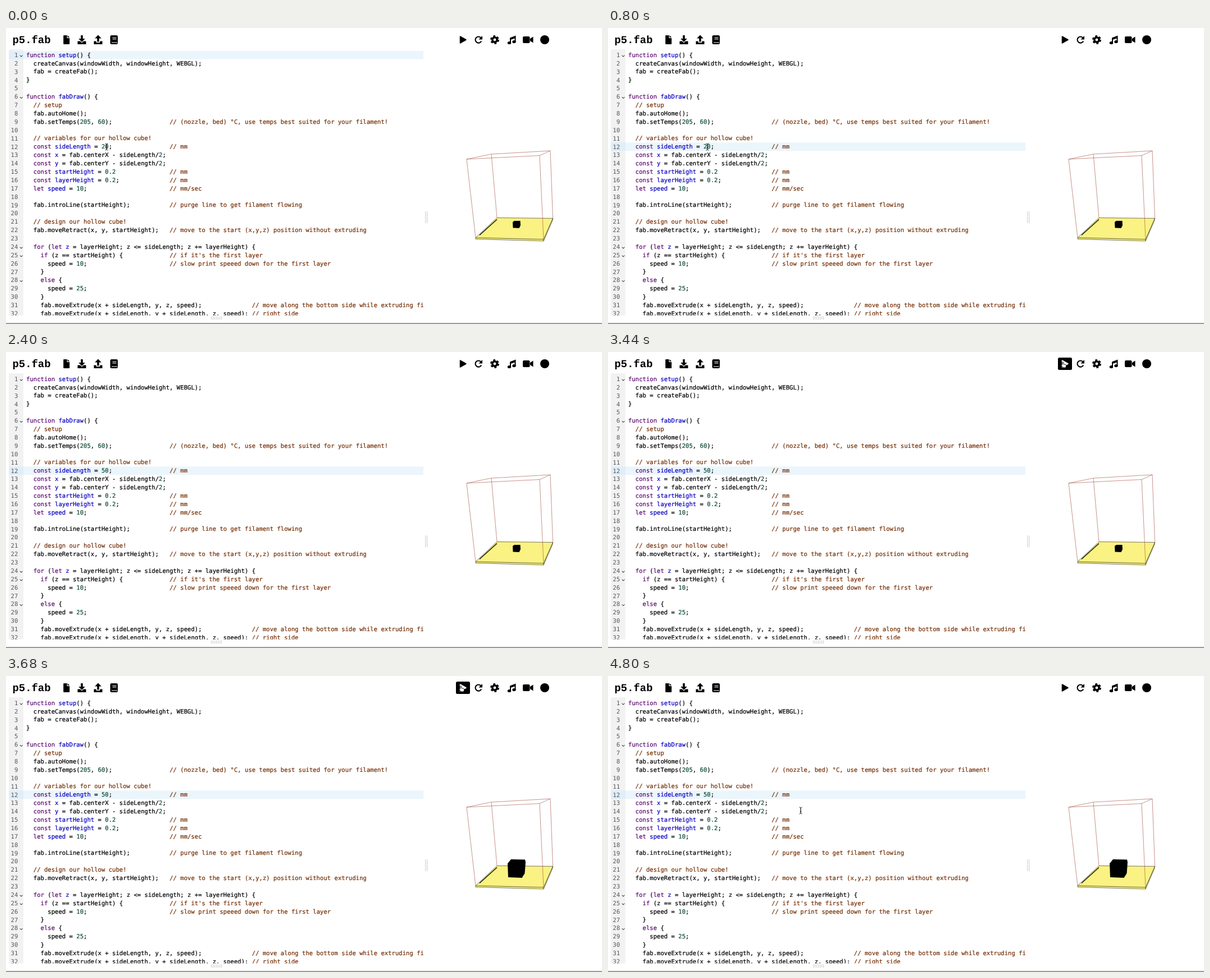
Write an HTML page that moves like this. It is 1061 by 528 pixels and loops after 4.88 s.

```html
<!DOCTYPE html>
<html lang="en">
<head>
<meta charset="utf-8">
<title>p5.fab editor</title>
<style>
  html, body { margin: 0; width: 100%; height: 100%; overflow: hidden; background: #fff; }
  svg { display: block; }
  text { white-space: pre; text-rendering: geometricPrecision; }
  #editor text { font: 10.605px "DejaVu Sans Mono", monospace; stroke: #000; stroke-width: .22; }
  .title { font: bold 18.9px "Liberation Mono", "Courier New", monospace; }
  #editor .keyword { fill: #5c0a70; stroke: #5c0a70; }
  #editor .name { fill: #0a00c0; stroke: #0a00c0; }
  #editor .number { fill: #0f4c38; stroke: #0f4c38; }
  #editor .comment { fill: #742f06; stroke: #742f06; }
  #editor .lineno { fill: #555; stroke: none; text-anchor: end; }
  .line { fill: none; stroke: #000; }
</style>
</head>
<body>
<svg width="1061" height="528" viewBox="0 0 1061 528">
  <defs>
    <clipPath id="pane"><path d="M5 38H743V512.5H5z"/></clipPath>
    <pattern id="dots" width="3" height="3" patternUnits="userSpaceOnUse"><path d="M0 0h1.4v1.4H0z" fill="#b4b4b4"/></pattern>
  </defs>

  <text class="title" x="11.500" y="27">p5.fab</text>
  <g id="fileIcons">
    <path d="M103 13h5.5v5h4.700v10q0 1-1 1h-9q-1 0-1-1v-14q0-1 .8-1zM109.600 13l3.600 3.800h-3.600z"/>
    <path d="M133.200 13h3.600v6h4l-5.800 6-5.800-6h4zM127.500 23.500h4.500l3 3 3-3h4.500v5.500h-15z"/>
    <path d="M162.200 24.500v-6h-4l5.800-6 5.800 6h-4v6zM156.500 23.500h4.200v2.500h6.600v-2.500h4.200v5.500h-15z"/>
    <rect x="185.500" y="13" width="13.500" height="16" rx="2.500"/>
    <path d="M189.500 17.500h7M189.500 20h7M188 26h10" stroke="#fff" stroke-width="1.200"/>
  </g>

  <rect id="button" x="801" y="10" width="25" height="22" rx="2.500"/>
  <path id="play" d="M808.500 15v12l10.500-6z" stroke-width="1.500" stroke-linejoin="round"/>
  <path class="line" d="M846.200 23.500A5.600 5.600 0 1 1 845.500 17.500" stroke-width="2.100"/>
  <path d="M848 14v6.500h-6.500z"/>
  <circle class="line" cx="870" cy="21" r="4.200" stroke-width="3.600"/>
  <circle class="line" cx="870" cy="21" r="6.500" stroke-width="3" stroke-dasharray="3.600 3.207"/>
  <path d="M897 17.500l10.500-4v11h-2v-6l-6.500 2.300v6h-2z"/>
  <ellipse cx="896" cy="26.500" rx="3.200" ry="2.600"/>
  <ellipse cx="904.500" cy="24.500" rx="3.200" ry="2.600"/>
  <rect x="920" y="15" width="12.500" height="12" rx="2"/>
  <path d="M933 19l5.500-3.500v11l-5.500-3.500z"/>
  <circle cx="959" cy="21" r="8"/>

  <g clip-path="url(#pane)">
    <rect x="5" y="38" width="26" height="475" fill="#f2f2f2"/>
    <g id="active">
      <rect x="31" width="712" height="14.870" fill="#ebf5fc"/>
      <rect x="5" width="26" height="14.870" fill="#e0eef9"/>
    </g>
    <g id="flash" fill="#ff5f00"></g>
    <g id="editor"></g>
    <path id="caret" d="M176.300 205v13.500" stroke="#000"/>
  </g>
  <rect width="5" height="21" fill="url(#dots)" transform="translate(746 327.500)"/>
  <rect width="20" height="5" fill="url(#dots)" transform="translate(365 515)"/>
  <path d="M0 527h1061" stroke="#37343a"/>

  <g fill="none" stroke-linejoin="round" stroke-width=".6">
    <path d="M836 374L874 338.500 973.500 339.500 973 343 957 380 836 376.500z" fill="#faf282" stroke="#222"/>
    <path d="M836 374L957 377 973.500 339.500M957 377V380" stroke="#000"/>
    <path d="M843 369.500L874 341.500" stroke="#000" stroke-width="1.200"/>
    <path d="M820 234L864 225 969 219 950 227.500zL836 374M864 225L874 338.500M969 219L973.500 339.500M950 227.500L957 377" stroke="#a04a3c"/>
    <path id="cube" fill="#000"/>
  </g>

  <g id="pointer" stroke-linejoin="round">
    <path id="ibeam" d="M-2.500-6Q0-6 0-4V4Q0 6-2.500 6M2.500-6Q0-6 0-4V4Q0 6 2.500 6M-1.500 2h3" fill="none" stroke="#333"/>
    <path id="arrow" d="M0 0V12L2.800 9.500 4.700 13.500 6.500 12.700 4.700 8.800H8.500z" stroke="#fff" stroke-width=".8"/>
    <path id="hand" d="M-2.500-4q1-1.500 2 0v3.500l4 .8q1.500.4 1.200 2l-.8 3.700h-5l-3.200-4.500q0-1.300 1.800-.5z"
      fill="#fff" stroke="#000" stroke-width=".9"/>
  </g>
</svg>

<script>
const code = `function setup() {
  createCanvas(windowWidth, windowHeight, WEBGL);
  fab = createFab();
}

function fabDraw() {
  // setup
  fab.autoHome();
  fab.setTemps(205, 60);                // (nozzle, bed) °C, use temps best suited for your filament!
${"  "}
  // variables for our hollow cube!
  const sideLength = 50;                // mm
  const x = fab.centerX - sideLength/2;${" "}
  const y = fab.centerY - sideLength/2;
  const startHeight = 0.2               // mm
  const layerHeight = 0.2;              // mm
  let speed = 10;                       // mm/sec

  fab.introLine(startHeight);           // purge line to get filament flowing

  // design our hollow cube!
  fab.moveRetract(x, y, startHeight);   // move to the start (x,y,z) position without extruding

  for (let z = layerHeight; z <= sideLength; z += layerHeight) {${" "}
    if (z == startHeight) {             // if it's the first layer
      speed = 10;                       // slow print speeed down for the first layer
    }
    else {
      speed = 25;
    }
    fab.moveExtrude(x + sideLength, y, z, speed);              // move along the bottom side while extruding filament
    fab.moveExtrude(x + sideLength, y + sideLength, z, speed); // right side`.split("\n");

const LOOP = 4880, STEP = 80, PITCH = 14.873, CHAR = 6.384, LEFT = 36;
const $ = id => document.getElementById(id);
const show = (id, on) => $(id).style.display = on ? "" : "none";
const rowY = row => 40.7 + row * PITCH;

const tokens = /(?<comment>\/\/.*)|(?<name>(?<=(?:function|const|let) )\w+)|(?<keyword>\b(?:function|const|let|for|if|else)\b)|(?<number>\b\d[\d.]*)/g;
const highlight = line => line.replace(/</g, "&lt;").replace(tokens, (text, ...rest) => {
  const groups = rest.at(-1);
  const kind = Object.keys(groups).find(key => groups[key]);
  return `<tspan class="${kind}">${text}</tspan>`;
});

const foldable = [1, 6, 24, 25, 28];
code.forEach((line, row) => {
  const y = rowY(row);
  $("flash").innerHTML += `<rect x="${LEFT - .5}" y="${y + 1}" width="${line && line.length * CHAR + 1}" height="12.6"/>`;
  $("editor").innerHTML += `<text class="lineno" x="21.300" y="${y + 11.2}">${row + 1}</text>
    <text x="${LEFT}" y="${y + 11}">${highlight(line)}</text>` +
    (foldable.includes(row + 1) ? `<path class="line" d="M25 ${y + 8}l2.200 2.500 2.200-2.500"/>` : "");
});
const sideLength = [...document.querySelectorAll("#editor .number")].find(el => el.textContent === "50");

const smallCube = "M902 346L905 344 915.5 344 916 352 913.5 357 902.5 356.500z";
const largeCube = "M893 334.500L899 327 924 327.500 925 332 923.500 352 918.500 360 894 359z";

// Pointer stops: time, x, y
const stops = [[0, 179, 212], [320, 177, 212], [2480, 177, 212], [3080, 811, 22], [4440, 811, 22], [4800, 343, 240], [LOOP, 343, 240]];
function pointerAt(t) {
  const i = stops.findIndex(stop => stop[0] > t);
  const [t0, x0, y0] = stops[i - 1], [t1, x1, y1] = stops[i];
  const p = (t - t0) / (t1 - t0), e = p * p * (3 - 2 * p);
  return [x0 + (x1 - x0) * e, y0 + (y1 - y0) * e];
}

function draw(t) {
  const during = (from, to) => t >= from && t < to;
  const [x, y] = pointerAt(t);
  const hover = x > 801 && x < 826 && y > 10 && y < 32;
  const inEditor = x < 743 && y > 38;

  $("active").setAttribute("transform", `translate(0 ${rowY(t < 200 ? 0 : 11)})`);
  sideLength.textContent = t < 1280 ? "20" : t < 1600 ? "0" : "50";
  $("caret").setAttribute("transform", `translate(${during(1280, 1600) ? -CHAR : 0} 0)`);
  show("caret", during(200, 800) || during(1280, 2200) || during(2800, 3400));
  show("flash", during(3520, 3680));
  $("cube").setAttribute("d", t < 3520 ? smallCube : largeCube);

  show("button", hover);
  $("play").setAttribute("fill", hover ? "#fff" : "#000");
  $("play").setAttribute("stroke", hover ? "#fff" : "#000");
  $("pointer").setAttribute("transform", `translate(${x} ${y})`);
  show("pointer", !during(1280, 2480));
  show("ibeam", inEditor);
  show("hand", hover);
  show("arrow", !inEditor && !hover);
}

const start = performance.now();
function tick() {
  const t = (performance.now() - start) % LOOP;
  draw(Math.floor(t / STEP) * STEP);
  requestAnimationFrame(tick);
}
tick();
</script>
</body>
</html>
```
